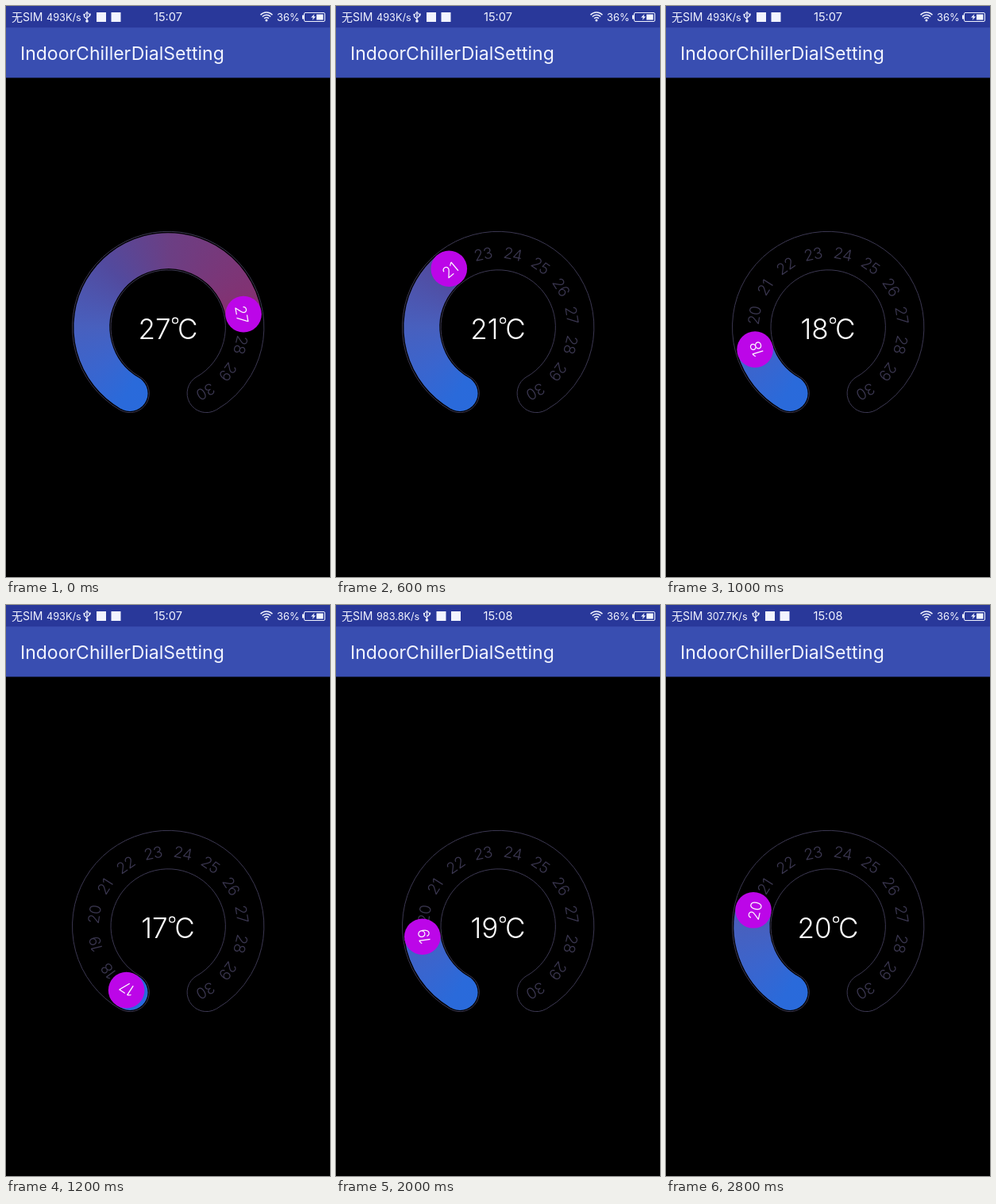
Write an HTML page with a canvas that moves like this. It is 408 px wide and 720 px high and loops after 3000 ms.

```html
<!DOCTYPE html>
<html lang="en">
<head>
<meta charset="utf-8">
<title>Temperature dial</title>
<style>
  html, body { margin: 0; width: 100%; height: 100%; overflow: hidden; background: #000; }
  canvas { display: block; width: 408px; height: 720px; }
</style>
</head>
<body>
<canvas id="stage"></canvas>
<script>
const W = 408, H = 720, LOOP = 3000, STEP = 200;
const CX = 204.2, CY = 405, R_OUT = 120.7, R_IN = 72.2, R_MID = 96.3, R_TEXT = 94;
const START = 120, SWEEP = 300, LOW = 17, HIGH = 30;
const TICK = SWEEP / (HIGH - LOW);
const LINE = '#3c3852', KNOB = 22.8, FILL = 45;
const FONT = 'Inter, "Noto Sans CJK SC", "Noto Sans CJK", sans-serif';

// Knob angle in degrees, as [time, angle]
const KEYS = [[0, 350.2], [200, 293.5], [400, 261], [600, 230], [800, 202.9], [1200, 123.1],
  [1600, 120.8], [2000, 172.1], [2800, 192.1]];

const canvas = document.getElementById('stage');
const ctx = canvas.getContext('2d');
const ratio = window.devicePixelRatio || 1;
canvas.width = W * ratio;
canvas.height = H * ratio;

const rad = deg => deg * Math.PI / 180;
const polar = (deg, r) => [CX + r * Math.cos(rad(deg)), CY + r * Math.sin(rad(deg))];

const sweep = ctx.createConicGradient(rad(90), CX, CY);
[[90, '#286adc'], [122, '#2a6ada'], [150, '#3a65ce'], [180, '#4860be'], [225, '#524a9e'],
  [270, '#6b3f84'], [350, '#86306f'], [450, '#9c2a50']]
  .forEach(([deg, color]) => sweep.addColorStop((deg - 90) / 360, color));

function angleAt(t) {
  let i = 1;
  while (i < KEYS.length - 1 && KEYS[i][0] < t) i++;
  const [t0, a0] = KEYS[i - 1], [t1, a1] = KEYS[i];
  return a0 + (a1 - a0) * Math.min(1, (t - t0) / (t1 - t0));
}

function text(str, x, y, size, { color = '#f2f4ff', weight = 400, align = 'left' } = {}) {
  ctx.font = `${weight} ${size}px ${FONT}`;
  ctx.fillStyle = color;
  ctx.textAlign = align;
  ctx.fillText(str, x, y);
}

function disc(x, y, r, color) {
  ctx.fillStyle = color;
  ctx.beginPath();
  ctx.arc(x, y, r, 0, 2 * Math.PI);
  ctx.fill();
}

function box(x, y, w, h, color) {
  ctx.fillStyle = color;
  ctx.fillRect(x, y, w, h);
}

function path(points, width = 1.2) {
  ctx.lineWidth = width;
  ctx.beginPath();
  points.forEach(([x, y], i) => i ? ctx.lineTo(x, y) : ctx.moveTo(x, y));
  ctx.stroke();
}

function usb(x) {
  ctx.strokeStyle = '#f2f4ff';
  path([[x, 9], [x, 19]]);
  path([[x - 3.5, 11], [x - 3.5, 13.5], [x, 16.5]]);
  path([[x + 3.5, 10.5], [x + 3.5, 12.5], [x, 15]]);
  path([[x - 2, 10], [x, 7.5], [x + 2, 10]]);
  disc(x, 19, 1.8, '#f2f4ff');
  disc(x - 3.5, 11, 1.2, '#f2f4ff');
  box(x + 2.5, 9.5, 2.2, 2.2, '#f2f4ff');
}

function wifi(x, y) {
  ctx.strokeStyle = '#f2f4ff';
  ctx.lineWidth = 1.5;
  for (const r of [4, 7.2, 10.4]) {
    ctx.beginPath();
    ctx.arc(x, y, r, rad(-136), rad(-44));
    ctx.stroke();
  }
  disc(x, y - 0.5, 1.5, '#f2f4ff');
}

function battery() {
  ctx.strokeStyle = '#f2f4ff';
  ctx.lineWidth = 1;
  ctx.beginPath();
  ctx.roundRect(375.5, 8.5, 26, 11, 1.5);
  ctx.stroke();
  box(373, 11.5, 2, 5, '#f2f4ff');
  box(391, 10.5, 8.5, 7, '#f2f4ff');
  ctx.fillStyle = '#f2f4ff';
  ctx.beginPath();
  [[388.5, 10], [384, 14.6], [386.8, 14.6], [385.8, 18], [390, 13.2], [387.4, 13.2]]
    .forEach(p => ctx.lineTo(...p));
  ctx.fill();
}

function bars(t) {
  box(0, 0, W, 90.5, '#394eb1');
  box(0, 0, W, 27.2, '#29389a');
  const speed = t < 2000 ? '493K/s' : t < 2400 ? '983.8K/s' : '307.7K/s';
  const shift = t < 2000 ? 0 : t < 2400 ? 12.5 : 11;
  text('无SIM', 7, 19, 14);
  text(speed, 51, 18.5, 12.7);
  usb(102 + shift);
  box(114 + shift, 8, 12, 12, '#f2f4ff');
  box(132.5 + shift, 8, 12, 12, '#f2f4ff');
  text(t < 1600 ? '15:07' : '15:08', 204, 19.2, 14.6, { align: 'center' });
  wifi(328, 18.5);
  text('36%', 341, 18.5, 13);
  battery();
  text('IndoorChillerDialSetting', 18, 68, 23);
}

function outline() {
  const a = rad(START), b = rad(START + SWEEP), cap = (R_OUT - R_IN) / 2;
  ctx.strokeStyle = LINE;
  ctx.lineWidth = 1;
  ctx.beginPath();
  ctx.arc(CX, CY, R_OUT, a, b);
  ctx.arc(...polar(START + SWEEP, R_MID), cap, b, b + Math.PI);
  ctx.arc(CX, CY, R_IN, b, a, true);
  ctx.arc(...polar(START, R_MID), cap, a + Math.PI, a + 2 * Math.PI);
  ctx.stroke();
}

function label(n, deg, size, style) {
  ctx.save();
  ctx.translate(...polar(deg, R_TEXT));
  ctx.rotate(rad(deg + 90));
  text(n, 0, size * 0.36, size, { align: 'center', weight: 300, ...style });
  ctx.restore();
}

function dial(angle, value) {
  outline();
  for (let n = LOW; n <= HIGH; n++)
    label(n, START + (n - LOW) * TICK, 19.4, { color: LINE });

  disc(...polar(START, R_MID), FILL / 2, sweep);
  ctx.strokeStyle = sweep;
  ctx.lineWidth = FILL;
  ctx.beginPath();
  ctx.arc(CX, CY, R_MID, rad(START), rad(angle));
  ctx.stroke();

  disc(...polar(angle, R_MID), KNOB, '#bc06e8');
  label(value, angle, 19.4, { color: '#fff' });
}

function readout(value) {
  const style = { color: '#fff', weight: 300 };
  ctx.font = `300 35px ${FONT}`;
  const w = ctx.measureText(value).width;
  const x = 204 - (w + 34) / 2;
  text(value, x, 419.5, 35, style);
  text('C', x + w + 8.5, 419.5, 35, style);
  ctx.strokeStyle = '#fff';
  ctx.lineWidth = 1.4;
  ctx.beginPath();
  ctx.arc(x + w + 5.5, 396.7, 3.4, 0, 2 * Math.PI);
  ctx.stroke();
}

function draw(now) {
  const t = Math.floor((now % LOOP) / STEP) * STEP;
  const angle = angleAt(t);
  const value = Math.floor(LOW + (angle - START) / TICK + 0.05);
  ctx.setTransform(ratio, 0, 0, ratio, 0, 0);
  box(0, 0, W, H, '#000');
  bars(t);
  dial(angle, value);
  readout(value);
}

const origin = performance.now();
function tick() {
  draw(performance.now() - origin);
  requestAnimationFrame(tick);
}
tick();
</script>
</body>
</html>
```
